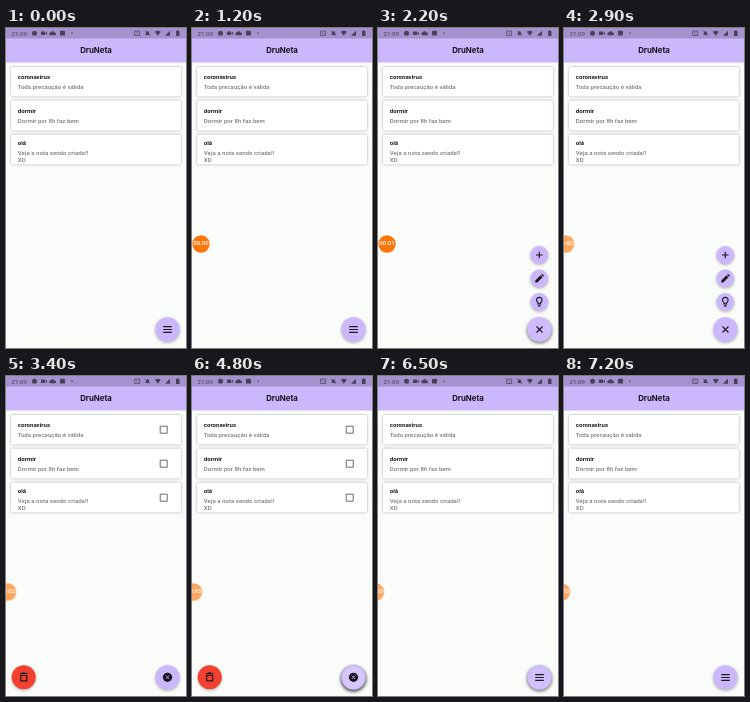
Recreate the animation shown at these times as an HTML page. Size 180 by 320 pixels, loop 7700 ms.

```html
<!DOCTYPE html>
<html lang="pt">
<head>
<meta charset="utf-8">
<title>DruNeta</title>
<style>
html, body { margin: 0; width: 100%; height: 100%; overflow: hidden; background: #fafcf9; }
svg { display: block; width: 180px; height: 320px; }
text { font-family: Roboto, sans-serif; font-size: 6.1px; }
.brand { font: 700 7.8px Inter, sans-serif; fill: #15121d; text-anchor: middle; }
.clock { font-size: 6.2px; fill: #494158; }
.name { font-weight: 700; fill: #1d1d1d; }
.note { font-weight: 500; fill: #7b7b7b; }
.card { fill: #fff; filter: drop-shadow(0 .8px .9px rgba(0,0,0,.38)); }
.disc { fill: #cab7fc; filter: drop-shadow(0 1.5px 1.4px rgba(0,0,0,.3)); }
.line { fill: none; stroke: #1c1923; stroke-width: 1.15; }
.box { fill: none; stroke: #626262; stroke-width: .95; }
.status { fill: #494158; }
.thin { fill: none; stroke: #494158; stroke-width: .7; }

.anim, .dial, .main, .wave, .glow { animation: 7.7s linear infinite; }
.hard { animation-timing-function: step-end; }
.home { animation-name: home; }
.open { animation-name: open; }
.edit { animation-name: edit; }
.dial { animation-name: dial; transform-box: fill-box; transform-origin: center; }
.glow { animation-name: lift; }
.wave { animation-name: wave; fill: #fff; transform-box: fill-box; transform-origin: center; }
.bubble { animation-name: bubble; }
.time { font-size: 3.7px; font-weight: 500; fill: #fff; text-anchor: middle; }
.s0 { animation-name: s0; }
.s1 { animation-name: s1; }
.s2 { animation-name: s2; }
.s3 { animation-name: s3; }

@keyframes home { 0% { opacity: 1 } 25.97% { opacity: 0 } 81.81% { opacity: 1 } }
@keyframes open { 0% { opacity: 0 } 25.97% { opacity: 1 } 44.15% { opacity: 0 } }
@keyframes edit { 0% { opacity: 0 } 44.15% { opacity: 1 } 81.81% { opacity: 0 } }
@keyframes dial {
  0%, 25.97% { transform: scale(0) }
  28.5%, 100% { transform: scale(1) }
}
@keyframes lift {
  0%, 24.67%, 31%, 59.73%, 68.9%, 80.51%, 87.02%, 100% { opacity: 0 }
  26%, 62%, 66%, 82% { opacity: 1 }
}
@keyframes wave {
  0%, 24.67% { transform: scale(.2); opacity: 0 }
  26% { transform: scale(.7); opacity: .25 }
  28.5% { transform: scale(1); opacity: .06 }
  31% { transform: scale(1); opacity: 0 }
  31.01%, 59.73% { transform: scale(.2); opacity: 0 }
  62.3% { transform: scale(.9); opacity: .22 }
  66% { transform: scale(1); opacity: .2 }
  68.9% { transform: scale(1); opacity: 0 }
  68.91%, 80.51% { transform: scale(.2); opacity: 0 }
  82.5% { transform: scale(.9); opacity: .22 }
  87.02%, 100% { transform: scale(1); opacity: 0 }
}
@keyframes bubble {
  0%, 2.59% { transform: translate(9px, 216px); opacity: 0 }
  2.6%, 29.86% { transform: translate(9px, 216px); opacity: 1 }
  33.76%, 70.12% { transform: translate(1.6px, 216px); opacity: .64 }
  70.13%, 100% { transform: translate(-2.4px, 216px); opacity: .62 }
}
@keyframes s0 { 0% { opacity: 1 } 16.88% { opacity: 0 } }
@keyframes s1 { 0% { opacity: 0 } 16.88% { opacity: 1 } 29.87% { opacity: 0 } }
@keyframes s2 { 0% { opacity: 0 } 29.87% { opacity: 1 } 54.54% { opacity: 0 } }
@keyframes s3 { 0% { opacity: 0 } 54.54% { opacity: 1 } }
</style>
</head>
<body>
<svg viewBox="0 0 180 320">
  <rect width="180" height="320" fill="#fafcf9"/>
  <rect width="180" height="34.5" fill="#cab7fc"/>
  <rect width="180" height="10.5" fill="#a491cd"/>

  <text class="clock" x="5.5" y="7.6">21:09</text>
  <g class="status">
    <circle cx="28.5" cy="5.2" r="2.5"/>
    <path d="M35 3.5h4v3.6h-4zM39 5.2l2-1.5v3.2z"/>
    <path d="M44.8 7.3a1.5 1.5 0 0 1 0-3a2 2 0 0 1 3.6.2a1.4 1.4 0 0 1 .4 2.8z"/>
    <rect x="54" y="2.8" width="5" height="4.8" rx=".7"/>
    <circle cx="66" cy="5.3" r=".8"/>
    <path d="M139.2 7a1 1 0 0 0 .6-1v-1a1.7 1.7 0 0 1 3.4 0v1a1 1 0 0 0 .6 1z"/>
    <path d="M148.8 3.7q3-2 6 0l-3 4z"/>
    <path d="M159 7.8h5v-5z"/>
    <path d="M170 3h1v-.7h1.5V3h1v5h-3.500z"/>
  </g>
  <path class="thin" d="M128.600 3.100h5v4.400h-5zM130 4.500l2.200 1.800M138.900 2.600l5 5.200"/>
  <text class="brand" x="90" y="25">DruNeta</text>

  <rect class="card" x="5" y="39" width="170" height="29.500" rx="1.800"/>
  <rect class="card" x="5" y="72.500" width="170" height="30" rx="1.800"/>
  <rect class="card" x="5" y="106.500" width="170" height="30" rx="1.800"/>
  <g class="name">
    <text x="11.800" y="51">coronavirus</text>
    <text x="11.800" y="85">dormir</text>
    <text x="11.800" y="117">olá</text>
  </g>
  <g class="note">
    <text x="11.800" y="61">Toda precaução é válida</text>
    <text x="11.800" y="95.200">Dormir por 8h faz bem</text>
    <text x="11.800" y="127">Veja a nota sendo criada!!</text>
    <text x="11.800" y="133.900">XD</text>
  </g>

  <g class="anim hard edit">
    <path class="box" d="M154.200 50.200h7v7h-7zM154.200 84.200h7v7h-7zM154.200 118.200h7v7h-7z"/>
    <circle cx="17.700" cy="301.300" r="12" style="fill:#f4402f" class="disc"/>
    <path class="line" d="M14.700 299.400h6v5.500h-6zM14 297.500h7.400M16.400 296.700h2.600"/>
  </g>

  <g class="anim hard open">
    <g class="dial">
      <circle class="disc" cx="161.300" cy="227" r="8.900"/>
      <path class="line" d="M158 227h6.600M161.300 223.700v6.600"/>
    </g>
    <g class="dial">
      <circle class="disc" cx="161.300" cy="250.500" r="8.900"/>
      <path fill="#1c1923" d="M157.300 254.500v-2l5.200-5.200 2 2-5.200 5.200zM163.100 246.700l.9-.9 2 2-.9.9z"/>
    </g>
    <g class="dial">
      <circle class="disc" cx="161.300" cy="274" r="8.900"/>
      <path class="line" stroke-width="1" d="M160 275.900v-1.300a2.800 2.800 0 1 1 2.600 0v1.300zM159.900 277.800h2.800"/>
    </g>
  </g>

  <circle class="glow" cx="161.500" cy="303" r="13" fill="#777" style="filter:blur(1.500px)"/>
  <circle class="disc" cx="161.500" cy="301.500" r="12.200"/>
  <circle class="wave" cx="161.500" cy="301.500" r="12.200"/>
  <path class="line anim hard home" d="M157.200 298.600h8.600M157.200 301.500h8.600M157.200 304.400h8.600"/>
  <path class="line anim hard open" d="M158.500 298.500l6 6M164.500 298.500l-6 6"/>
  <g class="anim hard edit">
    <circle cx="161.500" cy="301.300" r="4.600" fill="#15121d"/>
    <path d="M159.800 299.600l3.400 3.400M163.200 299.600l-3.400 3.400" stroke="#cab7fc" stroke-width=".9"/>
  </g>

  <g class="anim bubble">
    <circle r="8.700" fill="#ff7608"/>
    <g class="time">
      <text class="anim hard s0" y="1.300">00:00</text>
      <text class="anim hard s1" y="1.300">00:01</text>
      <text class="anim hard s2" y="1.300">00:02</text>
      <text class="anim hard s3" y="1.300">00:03</text>
    </g>
  </g>
</svg>
</body>
</html>
```
